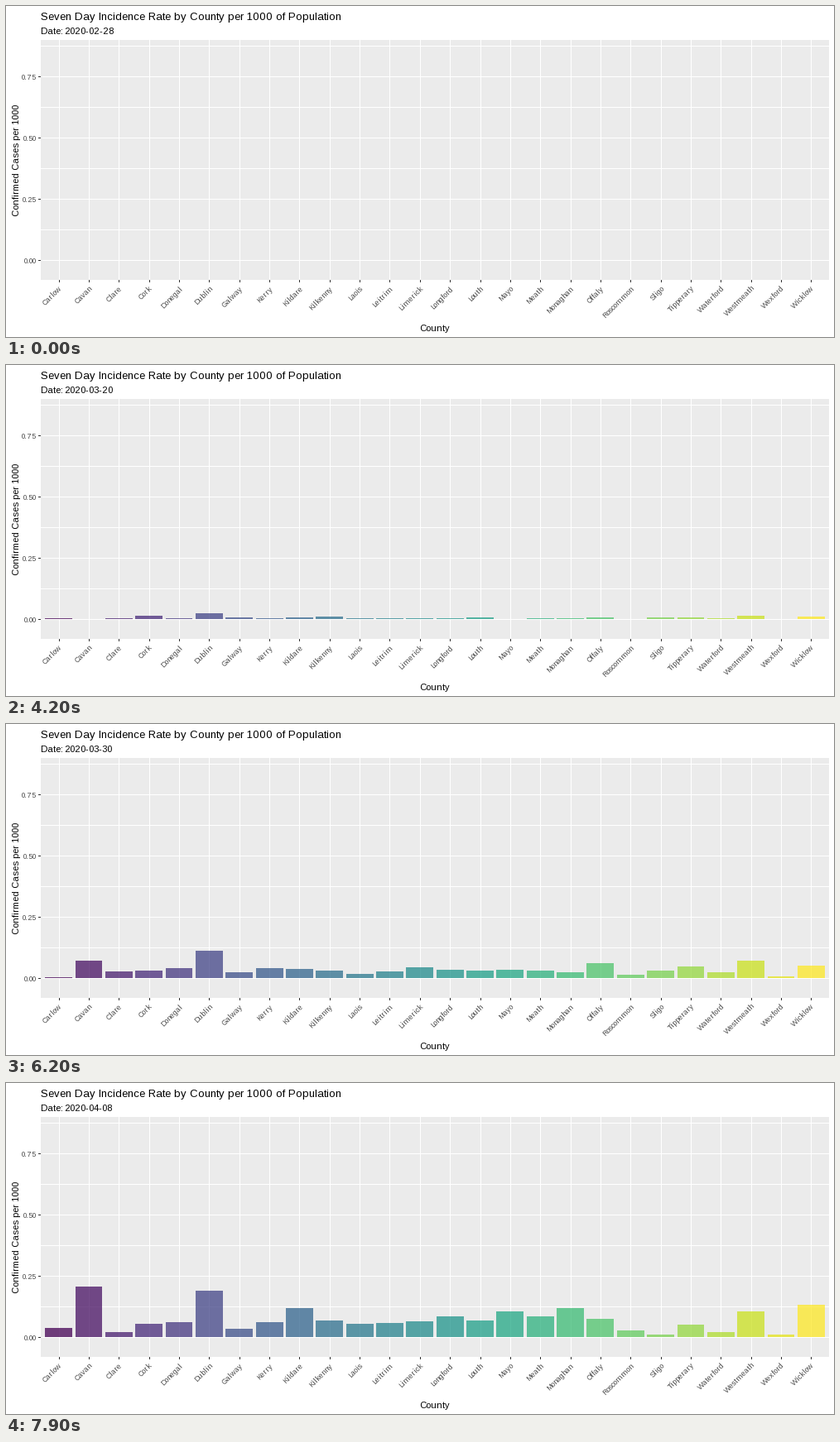
Animation of 1000 by 400 pixels, one loop 8 s. Source, as a matplotlib script:

```python
import matplotlib.pyplot as plt
import numpy as np
from matplotlib.animation import FuncAnimation
from matplotlib.patches import Rectangle

plt.rcParams.update({
    "font.family": "Liberation Sans",
    "text.hinting": "force_autohint",
    "text.hinting_factor": 1,
})

W, H, DPI = 1000, 400, 100
FRAMES, INTERVAL, LAST_DAY = 80, 100, 40
LEFT, RIGHT, TOP, BOTTOM = 42, 994, 41, 331
ZERO, UNIT = 307, 296          # pixel row of 0.00 and pixels per 1.00
START = np.datetime64("2020-02-28")

COUNTIES = ("Carlow Cavan Clare Cork Donegal Dublin Galway Kerry Kildare "
            "Kilkenny Laois Leitrim Limerick Longford Louth Mayo Meath "
            "Monaghan Offaly Roscommon Sligo Tipperary Waterford Westmeath "
            "Wexford Wicklow").split()
N = len(COUNTIES)

# Bar heights in pixels, one value per county
FIRST = np.array([1, 0, 1, 4, 1, 7, 2, 1, 2, 3, 1, 1, 1,
                  1, 2, 0, 1, 1, 2, 0, 2, 2, 1, 4, 0, 3])
RISE = np.array([2, 5, 10, 13, 4, 31, 9, 13, 9, 10, 5, 3, 8,
                 5, 8, 6, 8, 4, 11, 4, 5, 10, 9, 21, 2, 16])
DIP = np.array([0, 11, 8, 8, 7, 29, 7, 13, 7, 8, 4, 3, 10,
                7, 8, 7, 7, 6, 13, 4, 7, 11, 9, 23, 2, 14])
CLIMB = np.array([2, 31, 8, 9, 17, 37, 6, 10, 15, 10, 5, 13, 15,
                  12, 9, 13, 11, 8, 22, 3, 11, 16, 5, 19, 2, 16])
END = np.array([11, 61, 6, 16, 18, 56, 10, 18, 35, 20, 16, 17, 19,
                25, 20, 31, 25, 35, 22, 8, 3, 15, 6, 31, 3, 39])

# The first day's cases leave the seven day window after the peak
PEAK = RISE + 0.6 * (DIP + 2 * FIRST - RISE)
KEY_FRAMES = [41, 43, 52, 55, 57, 67, 79]
KEY_HEIGHTS = np.array([0 * FIRST, 2 * FIRST, RISE, PEAK, DIP, CLIMB, END])

STEP = (RIGHT - LEFT) / (N + 0.2)
CENTERS = LEFT + STEP * (np.arange(N) + 0.6)

fig = plt.figure(figsize=(W / DPI, H / DPI), dpi=DPI, facecolor="white")
ax = fig.add_axes([0, 0, 1, 1])
ax.set_xlim(0, W)
ax.set_ylim(H, 0)
ax.axis("off")


def box(x, y, w, h, color, alpha=1, z=1):
    patch = Rectangle((x, y), w, h, facecolor=color, alpha=alpha,
                      linewidth=0, antialiased=False, zorder=z)
    return ax.add_patch(patch)


def label(x, y, text, px, color="black", **kw):
    kw = {"ha": "left", "va": "baseline", **kw}
    return ax.text(x, y, text, fontsize=px * 72 / DPI, color=color,
                   rotation_mode="anchor", zorder=5, **kw)


def draw_panel():
    box(LEFT, TOP, RIGHT - LEFT, BOTTOM - TOP, "#EBEBEB")
    for value in np.arange(0, 1, 0.125):
        row = int(ZERO - value * UNIT)
        box(LEFT, row, RIGHT - LEFT, 1, "white")
        if value % 0.25 == 0:
            box(LEFT - 3, row, 3, 1, "#333333")
            label(37, row + 4, f"{value:.2f}", 9, "#4D4D4D", ha="right")
    for x, county in zip(CENTERS, COUNTIES):
        col = int(round(x))
        box(col, TOP, 1, BOTTOM - TOP, "white")
        box(col, BOTTOM, 1, 3, "#333333")
        label(x + 5, 341.5, county, 9, "#4D4D4D", ha="right", rotation=45)


def make_bars():
    colors = plt.get_cmap("viridis")(np.linspace(0, 1, N))
    bars = []
    for x, color in zip(CENTERS, colors):
        x0, x1 = round(x - 0.45 * STEP), round(x + 0.45 * STEP)
        bars.append(box(x0, ZERO, x1 - x0, 0, color, 0.75, 3))
    return bars


draw_panel()
bars = make_bars()
label(42, 17, "Seven Day Incidence Rate by County per 1000 of Population", 13)
label(518, 393, "County", 11, ha="center")
label(16, 186.5, "Confirmed Cases per 1000", 11, ha="center", rotation=90)
label(42, 34, "Date: ", 11)
date = label(70, 34, "", 11)


def update(frame):
    day = round(frame * LAST_DAY / (FRAMES - 1))
    date.set_text(str(START + day))
    for i, bar in enumerate(bars):
        height = np.interp(frame, KEY_FRAMES, KEY_HEIGHTS[:, i])
        height = int(height + 0.5)
        bar.set_y(ZERO - height)
        bar.set_height(height)
        bar.set_visible(height > 0)
    return [date, *bars]


anim = FuncAnimation(fig, update, frames=FRAMES, interval=INTERVAL,
                     init_func=lambda: update(0), repeat=True,
                     repeat_delay=0, blit=False)
plt.show()
```
